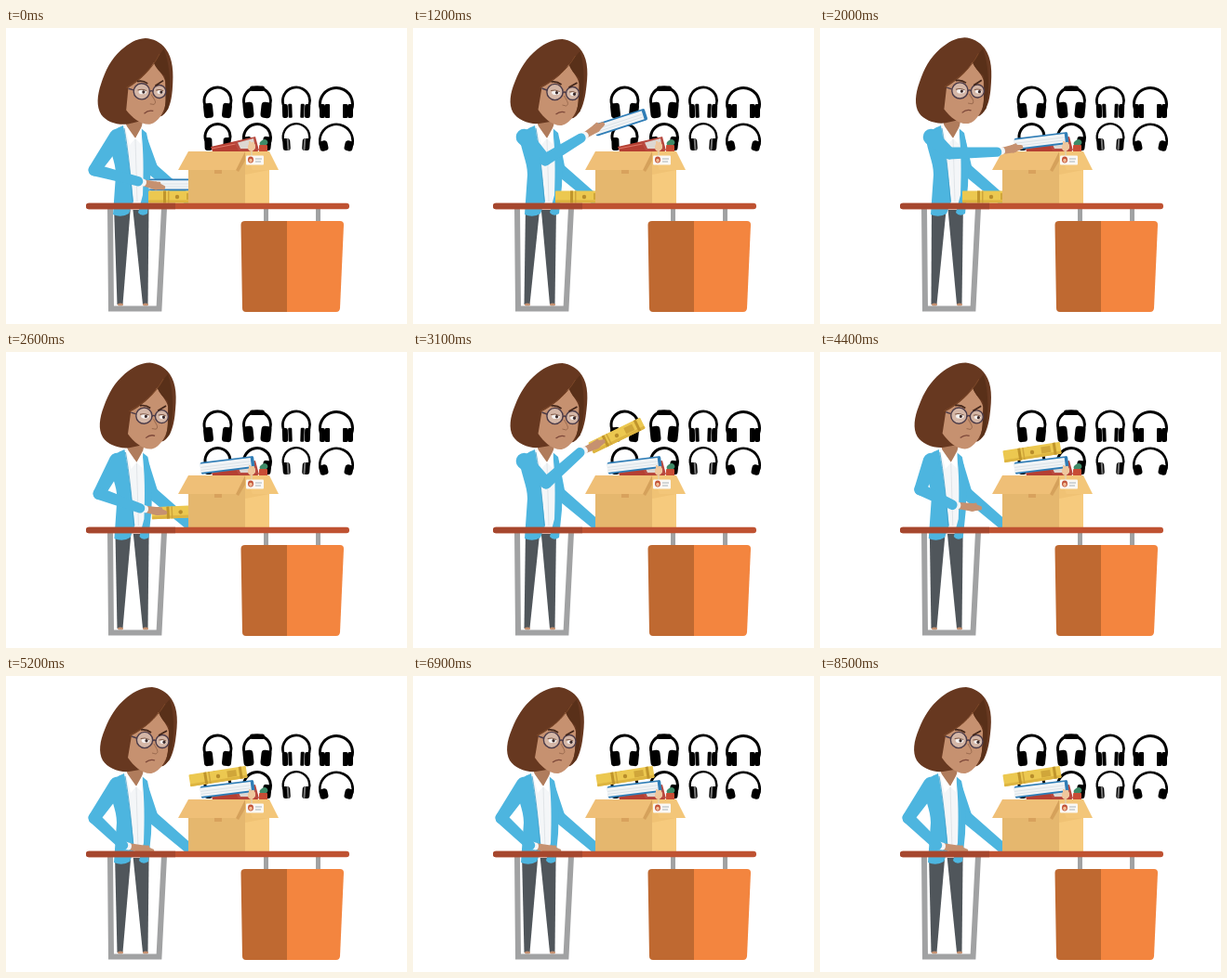
An HTML page with a canvas for the animation above (10000 ms loop, 431 by 319 pixels).

```html
<!DOCTYPE html>
<html lang="en">
<head>
<meta charset="utf-8">
<title>Packing a box</title>
<style>
html, body { margin: 0; width: 100%; height: 100%; overflow: hidden; background: #fff; }
canvas { display: block; width: 431px; height: 319px; }
</style>
</head>
<body>
<canvas id="stage"></canvas>
<script>
const LOOP = 10000, STEP = 100, W = 431, H = 319;
const canvas = document.getElementById('stage');
const ctx = canvas.getContext('2d');
const dpr = window.devicePixelRatio || 1;
canvas.width = W * dpr;
canvas.height = H * dpr;

const BLUE = '#4db5df', BLUE_DARK = '#3f9fca', SKIN = '#c69170', HAIR = '#673820',
      PANTS = '#50565b', GREY = '#a1a2a3', INK = '#4b3b48';

const fill = (d, color) => { ctx.fillStyle = color; ctx.fill(new Path2D(d)); };
const stroke = (d, color, width) => {
  ctx.strokeStyle = color;
  ctx.lineWidth = width;
  ctx.stroke(new Path2D(d));
};
const rect = (x, y, w, h, color, r = 0) => {
  ctx.fillStyle = color;
  ctx.beginPath();
  ctx.roundRect(x, y, w, h, r);
  ctx.fill();
};
const oval = (x, y, rx, ry, color, turn = 0) => {
  ctx.fillStyle = color;
  ctx.beginPath();
  ctx.ellipse(x, y, rx, ry, turn, 0, 7);
  ctx.fill();
};
const arc = (x, y, r, from, to, color, width) => {
  ctx.strokeStyle = color;
  ctx.lineWidth = width;
  ctx.beginPath();
  ctx.arc(x, y, r, from, to);
  ctx.stroke();
};
const at = (x, y, deg, draw) => {
  ctx.save();
  ctx.translate(x, y);
  ctx.rotate(deg * Math.PI / 180);
  draw();
  ctx.restore();
};

// Tapered segment with round ends
function limb(x1, y1, r1, x2, y2, r2, color) {
  const a = Math.atan2(y2 - y1, x2 - x1), h = Math.PI / 2;
  ctx.fillStyle = color;
  ctx.beginPath();
  ctx.arc(x1, y1, r1, a + h, a + 3 * h);
  ctx.arc(x2, y2, r2, a - h, a + h);
  ctx.fill();
}

// Eased interpolation through [time, values] keys
function track(keys, t) {
  let i = keys.length - 1;
  while (i > 0 && keys[i][0] > t) i--;
  const [t0, from] = keys[i];
  if (i === keys.length - 1) return from;
  const [t1, to] = keys[i + 1];
  const u = (t - t0) / (t1 - t0), e = u * u * (3 - 2 * u);
  return from.map((v, k) => v + (to[k] - v) * e);
}

// head x, y, tilt; body x; elbow; wrist; hand
const GRAB_BLUE = [-1, 0, -4, 0, 95, 153, 145, 166, 161, 170];
const LIFT_BLUE = [3.5, 0, 0, 5, 142, 142, 183, 117, 197, 108];
const DROP_BLUE = [3, -1, -3, 4, 139, 135, 193, 133, 208, 130];
const GRAB_GOLD = [0, 0, -2, 1, 95, 154, 143, 176, 159, 180];
const LIFT_GOLD = [3.5, 0, 0, 5, 143, 141, 182, 107, 197, 100];
const DROP_GOLD = [3, -1, -3, 4, 144, 134, 192, 114, 206, 111];
const REST = [0, 0, 0, 1, 95, 153, 129, 183, 149, 187];

const poseKeys = [
  [0, GRAB_BLUE], [350, GRAB_BLUE], [1100, LIFT_BLUE], [1300, LIFT_BLUE],
  [1850, DROP_BLUE], [2000, DROP_BLUE], [2400, GRAB_GOLD], [2500, GRAB_GOLD],
  [3000, LIFT_GOLD], [3200, LIFT_GOLD], [3850, DROP_GOLD], [4000, DROP_GOLD], [4600, REST]
];
const blueKeys = [
  [0, [182, 169, 0]], [350, [182, 169, 0]], [1100, [222, 102, -18]], [1300, [222, 102, -18]],
  [1850, [237, 122, -7]]
];
const goldKeys = [
  [0, [184, 182, 0]], [2500, [184, 182, 0]], [3000, [219, 90, -26]], [3200, [219, 90, -26]],
  [3850, [231, 106, -8]], [4100, [228, 108, -9]]
];

function headphones(x, top, bottom, span, cupW, cupH, opts = {}) {
  const { band = 3, pad = 0, inner = 0, lean = 6, plate = 0 } = opts;
  const r = (span - band) / 2, cy = top + band / 2 + r;
  arc(x, cy, r, Math.PI * 0.9, Math.PI * 2.1, '#000', band);
  if (pad) rect(x - pad, top, pad * 2, 5.5, '#000', 2.5);
  for (const s of [-1, 1]) {
    at(x + s * (span / 2 - cupW / 2 - 1), bottom - cupH / 2, s * lean, () => {
      rect(-cupW / 2, -cupH / 2, cupW, cupH, '#000', cupW * 0.35);
      if (inner) rect(-s * (cupW / 2 + 2.5) - inner / 2, -cupH / 2, inner, cupH, '#000', 1);
      if (plate) rect(-s * cupW * 0.2 - plate / 2, -cupH / 2, plate, cupH, '#777');
    });
  }
}

function wall() {
  headphones(227.5, 62.5, 97, 32, 10, 16);
  headphones(270, 62.5, 97, 32, 11, 17, { pad: 8 });
  headphones(312, 62.5, 97, 32, 6, 15, { inner: 4, band: 2.8, lean: 2 });
  headphones(355, 63, 97, 38, 6, 15, { inner: 5, band: 3, lean: 0 });
  headphones(227.5, 102, 132, 30, 8, 14, { lean: 2 });
  headphones(270, 102, 132, 32, 9, 15);
  headphones(312, 102, 132, 31, 8, 13, { band: 2.4, lean: 4, plate: 2 });
  headphones(355, 102.5, 132.5, 38, 9, 11, { band: 2.6, lean: 12 });
}

function cabinet() {
  rect(277, 194, 5, 16, GREY);
  rect(333, 194, 5, 16, GREY);
  fill('M257 208H303V306H258Q254 306 254 302L252.500 212Q252.500 208 257 208Z', '#bf6931');
  fill('M302 208H359Q363 208 363 212L359 302Q358.500 306 355 306H302Z', '#f3853f');
}

function legs(bx) {
  fill(`M${116 + bx} 192H${134 + bx * 0.5}L125.500 298H119.500Z`, PANTS);
  fill(`M${136 + bx * 0.3} 192H${153.5 + bx * 0.1}L152.500 298H147Z`, PANTS);
  oval(123, 298, 3, 1.6, SKIN);
  oval(150, 298, 3, 1.6, SKIN);
  stroke('M112 194L113 302.500H164.500L170 194', GREY, 6);
}

function torso(bx) {
  at(bx, 0, 0, () => {
    fill('M127 104L146 106L152 196H128Z', '#f4f6f8');
    fill('M126 105C119 108 112 111 110 119C111 132 118 144 118 158L115 201Q124 205 132 200L137 187C134 160 131 132 126 105Z', BLUE);
    fill('M145 108L151 113C155 130 156 150 155 170L152 200Q146 204 142 199L147 180C148 155 148 130 145 108Z', BLUE);
    stroke('M127 108C131 130 134 158 136 187', BLUE_DARK, 0.8);
    fill('M128 85L148 96L145 110L139 119L129 107Z', '#b07c5c');
    fill('M126 98L130 106L139 119L133 126Z', '#fff');
    fill('M146 106L139 119L145 125Z', '#fff');
    stroke('M139 120L141 187', '#d8dde1', 0.7);
  });
}

function farArm(bx) {
  limb(147 + bx, 123, 6, 157, 152, 6.5, BLUE);
  limb(157, 152, 6.5, 198, 187, 5.5, BLUE);
}

function head(x, y, tilt) {
  at(138 + x, 100 + y, tilt, () => {
    ctx.translate(-138, -100);
    fill('M157 12C165 13 173 17 178 25C185 36 185 50 182 70C180 82 177 92 169 97L150 100L132 103C121 104 109 99 104 91C99 82 101 70 106 58C112 43 118 33 130 23C139 16 147 12 157 12Z', HAIR);
    fill('M135 64C145 59 157 50 164 39C168 48 174 53 175 60L174 82C172 95 162 105 155 105C146 105 137 97 131 88Z', SKIN);
    fill('M176 25C182 44 181 72 176 90L171 95C175 82 176 64 175 54C170 50 166 45 164 39Z', '#593019');
    stroke('M171 30C161 47 148 56 133 64', '#7b4728', 1);
    for (const [ex, ey, r] of [[149, 69, 8.6], [168, 70.5, 7]]) {
      oval(ex, ey, r, r, 'rgba(226,220,220,.5)');
      oval(ex + 1, ey + 0.5, r * 0.5, r * 0.3, '#f6f2f0');
      oval(ex + 2, ey + 0.8, 1.6, 1.7, '#3b2a2a');
      stroke(`M${ex - r * 0.5} ${ey - 1.5}Q${ex} ${ey - 3} ${ex + r * 0.6} ${ey - 0.5}`, '#7d5541', 1);
      arc(ex, ey, r, 0, 7, INK, 1.4);
    }
    stroke('M157.500 70Q159.500 68 161 70M140.500 67L135 65', INK, 1.4);
    stroke('M145 58Q151 57 156 61M164 64L173 59', '#43261a', 1.7);
    stroke('M159 73C162 79 165 82 161 84L157 83', '#9c6c50', 1);
    stroke('M150 93Q155 89 160 91', '#7d483a', 1.3);
  });
}

function blueBook([x, y, deg]) {
  at(x, y, deg, () => {
    rect(-28, -6.5, 58, 13, '#2f7db6', 2);
    rect(-28.5, -4.8, 55, 9.4, '#f1f4f6');
    stroke('M-28 -1H26M-28 2H26', '#d3dce2', 0.7);
  });
}

function goldBook([x, y, deg]) {
  at(x, y, deg, () => {
    rect(-31, -6.5, 62, 13, '#ecc850', 1);
    rect(-31, 3.5, 62, 3, '#ddb440', 1);
    for (const bx of [-15, 23]) rect(bx, -6.5, 3, 13, '#c0952c');
    rect(-10, -6.5, 1.5, 13, '#cfa53a');
    rect(10, -4, 10, 7, '#d0a63a');
    oval(0, 0, 2.2, 2.2, '#b88d2b');
  });
}

function contents() {
  fill('M220 128L264 118L271 133H222Z', '#b53f32');
  stroke('M221 130L262 122', '#df7666', 1.2);
  fill('M245 123L268 117L272 132H250Z', '#b84a40');
  fill('M249 123.500L266 119L268 130H252Z', '#ddd7d2');
  oval(277, 124, 4.5, 3.5, '#3f8b68', -0.5);
  rect(272, 126, 9, 8, '#c94d35', 1);
}

function box() {
  rect(196, 133, 62, 56, '#e5b76e');
  rect(257, 133, 26, 56, '#f6ca7d');
  fill('M247 153L257 133V143L250 155Z', '#d5a15b');
  fill('M196 133H257L247 153H185Z', '#efbf77');
  fill('M257 133H283L293 153H265Z', '#f3c679');
  fill('M257 133L265 153H283L257 158Z', '#f0c274');
  rect(224, 153, 8, 4, '#d8a25d');
  stroke('M264 139V130', '#d9d2c5', 1);
  oval(264, 128, 4, 5, '#efc79d', 0.3);
  stroke('M262 122V128M266 123L265 129', '#efc79d', 2);
  rect(258, 137.5, 19, 10, '#faf8f4', 1);
  oval(263, 142, 3, 3.4, '#c25238');
  oval(263, 142.7, 1.8, 2, '#f2bd95');
  stroke('M268 141H275M268 144H274', '#a9b3ba', 1);
}

function nearArm([, , , , ex, ey, wx, wy, hx, hy]) {
  const a = Math.atan2(hy - wy, hx - wx), c = Math.cos(a), s = Math.sin(a);
  limb(wx, wy, 3.4, hx, hy, 4.4, SKIN);
  limb(hx, hy, 4.4, hx + c * 8, hy + s * 8, 2.4, SKIN);
  limb(hx - c * 4, hy - s * 4, 3, hx + c * 3 + s * 3.5, hy + s * 3 - c * 3.5, 1.6, SKIN);
  limb(wx - c * 3, wy - s * 3, 4.6, wx + c * 2, wy + s * 2, 4, '#f4f6f8');
  limb(119.5, 117.5, 8.8, ex, ey, 6.4, BLUE);
  limb(ex, ey, 6.4, wx - c * 3, wy - s * 3, 5.2, BLUE);
}

function deskTop() {
  rect(86, 188.7, 283, 6.5, '#bf5232', 3);
  rect(86, 188.7, 96, 6.5, '#a6472e', [3, 0, 0, 3]);
}

function draw(t) {
  const pose = track(poseKeys, t), [hx, hy, tilt, bx] = pose;
  ctx.setTransform(dpr, 0, 0, dpr, 0, 0);
  ctx.fillStyle = '#fff';
  ctx.fillRect(0, 0, W, H);
  wall();
  cabinet();
  legs(bx);
  farArm(bx);
  torso(bx);
  head(hx, hy, tilt);
  contents();
  blueBook(track(blueKeys, t));
  goldBook(track(goldKeys, t));
  box();
  nearArm(pose);
  deskTop();
}

const start = performance.now();
function tick() {
  const t = (performance.now() - start) % LOOP;
  draw(Math.floor(t / STEP) * STEP);
  requestAnimationFrame(tick);
}
tick();
</script>
</body>
</html>
```
